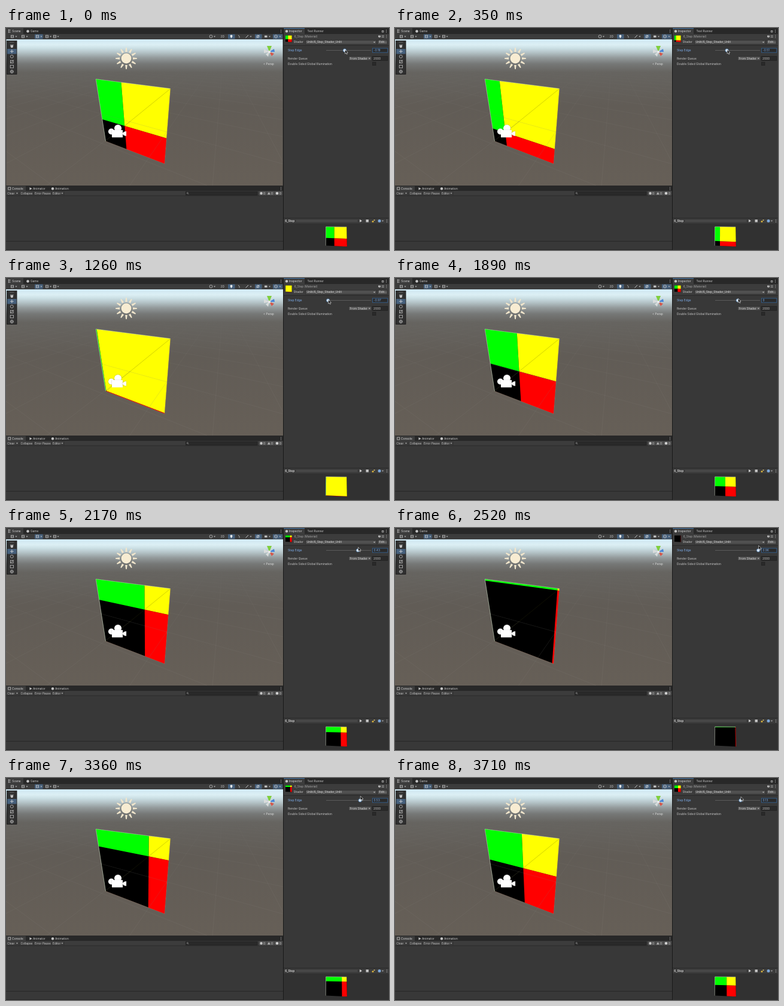
Write an HTML page with a canvas that moves like this. It is 640 by 372 pixels and loops after 3780 ms.

```html
<!DOCTYPE html>
<html lang="en">
<head>
<meta charset="utf-8">
<title>Step shader in the editor</title>
<style>
  html, body { margin: 0; width: 100%; height: 100%; overflow: hidden; background: #383838; }
  canvas { display: block; }
</style>
</head>
<body>
<canvas id="stage" width="640" height="372"></canvas>
<script>
const ctx = document.getElementById('stage').getContext('2d');
const LOOP = 3780, STEP = 70;

// [time, value] pairs, joined by straight lines
const EDGE = [[0, -.19], [700, -.83], [1050, -1], [1190, -1], [1260, -.97], [1890, 0],
  [2520, .96], [2660, 1], [2940, 1], [3080, .85], [3710, .13]];
const POINTER_Y = [[0, 36.5], [1260, 36.5], [1890, 34.5], [2520, 29.5], [3080, 29.5], [3710, 31.5]];

function sample(keys, t) {
  const i = keys.findIndex(k => k[0] >= t);
  if (i < 1) return keys[i < 0 ? keys.length - 1 : 0][1];
  const [t0, a] = keys[i - 1], [t1, b] = keys[i];
  return a + (b - a) * (t - t0) / (t1 - t0);
}

// ---- drawing helpers ----
function box(x, y, w, h, fill, border) {
  ctx.fillStyle = fill;
  ctx.fillRect(x, y, w, h);
  if (border) {
    ctx.strokeStyle = border;
    ctx.lineWidth = .8;
    ctx.strokeRect(x, y, w, h);
  }
}
function label(text, x, y, color = '#c8c8c8', weight = 400) {
  ctx.font = `${weight} 4.85px Inter, sans-serif`;
  ctx.textBaseline = 'middle';
  ctx.fillStyle = color;
  ctx.fillText(text, x, y);
}
function poly(points, fill) {
  ctx.beginPath();
  points.forEach(p => ctx.lineTo(...p));
  ctx.closePath();
  if (fill) { ctx.fillStyle = fill; ctx.fill(); }
}
function line(points, color, width = .8) {
  ctx.beginPath();
  points.forEach(p => ctx.lineTo(...p));
  ctx.strokeStyle = color;
  ctx.lineWidth = width;
  ctx.stroke();
}
function disc(x, y, r, fill) {
  ctx.beginPath();
  ctx.arc(x, y, r, 0, 7);
  ctx.fillStyle = fill;
  ctx.fill();
}
function ring(x, y, r, color = '#c4c4c4', width = .8) {
  ctx.beginPath();
  ctx.arc(x, y, r, 0, 7);
  ctx.strokeStyle = color;
  ctx.lineWidth = width;
  ctx.stroke();
}
const caret = (x, y) => poly([[x - 1.6, y - .8], [x + 1.6, y - .8], [x, y + 1.1]], '#b8b8b8');
const kebab = (x, y) => [-2, 0, 2].forEach(d => disc(x, y + d, .55, '#c4c4c4'));
const frame = (x, y, w, h) => { ctx.strokeStyle = '#c4c4c4'; ctx.lineWidth = .8; ctx.strokeRect(x, y, w, h); };

// ---- textured quad: corners are [x, y, weight] in order TL, TR, BL, BR ----
const SCENE_QUAD = [[150.2, 85.6, 1], [274.8, 101.6, .755], [166.6, 189.8, 1.243], [265, 227.6, .998]];
const PREVIEW_QUAD = [[534.6, 333, 1], [569.2, 333.4, 1], [534.3, 364.6, 1], [569.8, 366.3, 1]];
const ICON_QUAD = [[467, 12.4, 1], [477.6, 12.4, 1], [467, 23, 1], [477.6, 23.4, 1]];
const corners = quad => quad.map(([x, y]) => [x, y]);

function project(quad, u, v) {
  let x = 0, y = 0, sum = 0;
  quad.forEach(([px, py, weight], i) => {
    const w = weight * (i % 2 ? u : 1 - u) * (i > 1 ? v : 1 - v);
    x += px * w; y += py * w; sum += w;
  });
  return [x / sum, y / sum];
}
function patch(quad, u0, v0, u1, v1, fill) {
  poly([[u0, v0], [u1, v0], [u1, v1], [u0, v1]].map(([u, v]) => project(quad, u, v)), fill);
}
function stepQuad(quad, edge) {
  const u = (1 + edge) / 2, v = 1 - u;
  ctx.save();
  ctx.filter = 'blur(.45px)';
  patch(quad, 0, 0, 1, 1, '#000');
  patch(quad, 0, 0, u, v, '#0f0');
  patch(quad, u, v, 1, 1, '#f00');
  patch(quad, u, 0, 1, v, '#ff0');
  ctx.restore();
}

// ---- scene view ----
function grid(color, width) {
  const HORIZON = 36, BASE = 264;
  const fan = (vx, start, gap) => {
    for (let k = -10; k < 13; k++) line([[vx, HORIZON], [start + gap * k, BASE]], color, width);
  };
  fan(364, 68, 138.5);
  fan(-231, 594, 258);
}
function gradient(y0, y1, stops) {
  const g = ctx.createLinearGradient(0, y0, 0, y1);
  stops.forEach(([y, c]) => g.addColorStop((y - y0) / (y1 - y0), c));
  return g;
}
const SKY = gradient(19, 264, [[19, '#cfe8f3'], [28, '#dceff4'], [34, '#cbdfe4'], [41, '#b4c3c7'],
  [50, '#939a9b'], [60, '#767877'], [74, '#666460'], [130, '#615c56'], [264, '#665f57']]);
const GRID = gradient(60, 264, [[60, 'rgba(180,180,175,0)'], [130, 'rgba(180,180,175,.07)'], [264, 'rgba(180,180,175,.1)']]);

function sun(x, y) {
  ctx.save();
  ctx.translate(x, y);
  for (let i = 0; i < 12; i++) {
    poly([[-1.8, -11], [1.8, -11], [.8, -18], [-.8, -18]], '#f1e6cc');
    ctx.rotate(Math.PI / 6);
  }
  ctx.restore();
  ring(x, y, 9.2, 'rgba(110,105,95,.4)', 1.2);
  disc(x, y, 8.4, '#f7ecd2');
}
function cameraIcon() {
  ctx.save();
  ctx.shadowColor = 'rgba(90,90,90,.6)';
  ctx.shadowBlur = 1.5;
  disc(176, 173.5, 5, '#fff');
  disc(187, 168, 6, '#fff');
  box(177, 171, 18, 12.3, '#fff');
  poly([[194, 177], [197, 174], [201, 173], [201, 181], [197, 180]], '#fff');
  ctx.restore();
}
function axisGizmo(x, y) {
  poly([[x, y], [x - 9, y - 5], [x - 9, y + 2]], '#d8dcdc');
  poly([[x, y], [x - 6, y + 4], [x - 2, y + 8]], '#d8dcdc');
  poly([[x, y], [x + 8, y - 5], [x + 9, y]], '#4a86d8');
  poly([[x, y], [x + 8, y + 3], [x + 4, y + 7]], '#d5564a');
  poly([[x, y], [x - 4, y - 10], [x + 4, y - 10]], '#7fcf3d');
  box(x - 2, y - 2, 4, 4, '#e6e6e6');
}
function toolColumn() {
  box(1.5, 21.5, 16.5, 56, '#303030', '#171717');
  line([[6, 24], [13.5, 24]], '#777');
  box(2, 35, 15.5, 8.5, '#46607c');
  disc(9.8, 31, 2.2, '#c4c4c4');
  [-1.6, 0, 1.6].forEach(d => line([[9.8 + d, 31], [9.8 + d * 1.3, 27.6]], '#c4c4c4', 1));
  line([[6.8, 39.2], [12.8, 39.2]], '#e6e6e6');
  line([[9.8, 36.2], [9.8, 42.2]], '#e6e6e6');
  ring(9.8, 47.8, 2.5);
  frame(7.5, 54.2, 4.6, 4.6);
  line([[8, 58.3], [12.6, 53.7]], '#c4c4c4');
  frame(7.2, 62.3, 5.2, 4.6);
  ring(9.8, 73, 2.5);
  line([[6.8, 73], [12.8, 73]], '#c4c4c4', .6);
  line([[9.8, 70], [9.8, 76]], '#c4c4c4', .6);
}
function sceneView(edge) {
  ctx.save();
  ctx.beginPath();
  ctx.rect(0.5, 19, 462, 245);
  ctx.clip();
  box(0, 19, 463, 245, SKY);
  grid(GRID, .7);
  stepQuad(SCENE_QUAD, edge);

  ctx.save();
  patch(SCENE_QUAD, 0, .5, 1, 1);
  ctx.clip();
  grid('rgba(130,130,125,.3)', .6);
  ctx.restore();

  const [tl, tr, bl, br] = corners(SCENE_QUAD);
  line([tr, bl], 'rgba(70,70,20,.4)', .6);
  line([bl, tl, tr], 'rgba(205,220,195,.6)', 1);
  line([tr, br, bl], 'rgba(175,140,120,.5)', .8);

  sun(201, 51);
  cameraIcon();
  axisGizmo(440, 40);
  label('< Persp', 430, 60.3, '#e0e0e0');
  toolColumn();
  ctx.restore();
}

function sceneBars() {
  box(0, 0, 463, 10, '#282828');
  box(0, 0, 29, 10, '#3c3c3c');
  line([[3.5, 3.5], [8, 3.5]], '#c4c4c4');
  line([[3.5, 6.8], [8, 6.8]], '#c4c4c4');
  line([[4.8, 2], [4.8, 8.3]], '#c4c4c4');
  label('Scene', 10.3, 5.5, '#dedede');
  disc(36.5, 5.5, 2.3, '#c4c4c4');
  label('Game', 41, 5.5);
  kebab(459.5, 5.2);
  box(0, 10, 463, 9, '#3c3c3c');
  box(48, 10.5, 13.5, 7.8, '#46607c');
  [[10, 17], [28, 35], [52, 59], [68, 74.5], [81, 87]].forEach(([x, c]) => {
    frame(x - 1.5, 12.2, 4, 4);
    line([[x - 1.5, 14.2], [x + 2.5, 14.2]], '#c4c4c4', .5);
    caret(c, 14.3);
  });
  [[371, 11.5], [416, 11.5], [446, 16]].forEach(([x, w]) => box(x, 10.5, w, 7.8, '#46607c'));
  ring(342.5, 14.2, 2.4);
  caret(348.5, 14.3);
  label('2D', 358.5, 14.5);
  disc(376.5, 13.5, 1.9, '#e8e8e8');
  box(375.7, 15, 1.6, 1.8, '#e8e8e8');
  line([[388, 12], [390, 14], [390, 16.5]], '#c4c4c4');
  line([[400.5, 16.5], [405, 12]], '#c4c4c4', 1);
  caret(409, 14.3);
  ring(421, 14.2, 2, '#e8e8e8');
  line([[418.5, 16.5], [423.5, 12]], '#e8e8e8');
  box(432, 12.6, 4.5, 3.2, '#c4c4c4');
  caret(440.5, 14.3);
  ring(451, 14.2, 2.5);
  line([[448.5, 14.2], [453.5, 14.2]], '#c4c4c4', .5);
  caret(458, 14.3);
}

// ---- console ----
function consolePanel() {
  box(0, 264, 463, 108, '#383838');
  box(0, 264, 463, 9, '#282828');
  box(0, 264.8, 33, 8.2, '#3c3c3c');
  frame(3.7, 267, 4, 4);
  label('Console', 10, 269.3, '#dedede');
  poly([[39.5, 267], [43.5, 269.2], [39.5, 271.4]], '#c4c4c4');
  label('Animator', 45, 269.3);
  disc(78, 269.2, 2.2, '#c4c4c4');
  label('Animation', 82, 269.3);
  kebab(459.5, 269);
  box(0, 273, 463, 8, '#3c3c3c');
  line([[0, 281], [463, 281]], '#252525', .7);
  label('Clear', 2.2, 277.3);
  caret(18.5, 277);
  label('Collapse', 24.5, 277.3);
  label('Error Pause', 48, 277.3);
  label('Editor', 78, 277.3);
  caret(94, 277);
  [22, 46, 76, 97].forEach(x => line([[x, 273.5], [x, 280.5]], '#2b2b2b', .6));
  box(300.5, 274.2, 119.5, 5.8, '#292929', '#202020');
  ring(303.3, 276.6, 1.1, '#aaa', .6);
  line([[304, 277.5], [305.3, 278.8]], '#aaa', .6);
  [423, 436, 449].forEach(x => box(x, 273.5, 12.3, 7, '#505050'));
  disc(426.5, 277, 2.2, '#c4c4c4');
  label('0', 430, 277.3);
  poly([[437, 279], [441.6, 279], [439.3, 274.8]], '#b0b0b0');
  label('0', 443, 277.3);
  disc(453, 277, 2.3, '#d0d0d0');
  label('0', 457, 277.3);
  line([[0, 357.3], [463, 357.3]], '#232323');
  line([[0, 371.5], [463, 371.5]], '#232323');
}

// ---- inspector ----
function inspector(edge) {
  const x = 572.7 + 35.7 * edge;
  box(464, 0, 176, 372, '#383838');
  box(464, 0, 176, 10, '#282828');
  box(464, 0, 35, 10, '#3c3c3c');
  line([[464, .6], [499, .6]], '#3a79bb');
  disc(469, 5.4, 2.2, '#c4c4c4');
  label('Inspector', 473, 5.5, '#dedede');
  label('Test Runner', 503.5, 5.5);
  frame(628.3, 4.6, 2.6, 2.4);
  kebab(635.5, 5.2);

  box(464, 10, 176, 19, '#3c3c3c');
  line([[464, 29.2], [640, 29.2]], '#222', .7);
  stepQuad(ICON_QUAD, edge);
  label('6_Step (Material)', 481.8, 14.3, '#a8a8a8');
  disc(624, 14, 2.1, '#c4c4c4');
  label('?', 622.8, 14.3, '#3c3c3c');
  line([[627.5, 13], [632, 13]], '#c4c4c4');
  line([[627.5, 15.3], [632, 15.3]], '#c4c4c4');
  kebab(635.8, 14);
  label('Shader', 480.5, 23.7);
  box(500.5, 20.5, 118.5, 6.6, '#505050', '#303030');
  label('Unlit/6_Step_Shader_Unlit', 502.5, 23.7, '#dedede');
  caret(615.5, 23.8);
  box(621, 20.5, 16, 6.6, '#585858', '#303030');
  label('Edit...', 623.5, 23.7, '#dedede');

  label('Step Edge', 471, 37.6, '#7fb0f0');
  line([[535, 37.5], [610, 37.5]], '#656565');
  disc(x, 37.5, 3, 'rgba(83,139,196,.75)');
  disc(x, 37.5, 2.2, '#d8e6f4');
  box(612.5, 34, 25.3, 7, '#2a2a2a', '#34679d');
  label(String(+edge.toFixed(2) || 0), 614.5, 37.7, '#7fb0f0');

  label('Render Queue', 471, 51.4);
  box(572.5, 47.5, 38, 7, '#515151', '#303030');
  label('From Shader', 574.6, 51.3, '#dedede');
  caret(607.3, 51.1);
  box(612.5, 47.5, 25.3, 7, '#2a2a2a', '#212121');
  label('2000', 614, 51.4);
  label('Double Sided Global Illumination', 471, 60.2);
  box(612.5, 57.2, 5.4, 5.4, '#2a2a2a', '#212121');

  box(464, 319, 176, 8.5, '#3c3c3c');
  line([[464, 318.7], [640, 318.7]], '#222', .7);
  label('6_Step', 466.3, 323.4, '#dedede', 600);
  line([[485, 322.3], [587, 322.3]], '#606060', .6);
  line([[485, 324.2], [587, 324.2]], '#606060', .6);
  poly([[591, 320.8], [595, 323.2], [591, 325.6]], '#d0d0d0');
  box(601.5, 321, 4.4, 4.4, '#c4c4c4');
  disc(613, 324.3, 1.5, '#d8b23c');
  disc(615.5, 322, 1.1, '#d8c06a');
  disc(624, 323.2, 2.5, '#7da7d8');
  caret(629.5, 323.4);
  kebab(636.5, 323.2);
  box(464, 327.5, 176, 44.5, '#313131');
  stepQuad(PREVIEW_QUAD, edge);
  const [tl, tr, bl] = corners(PREVIEW_QUAD);
  line([bl, tl, tr], 'rgba(225,230,215,.55)', .9);
  line([[463.5, 0], [463.5, 372]], '#191919', 1);
  return x;
}

function pointer(x, y) {
  poly([[0, 0], [0, 6.6], [1.6, 5.2], [2.7, 7.6], [3.8, 7.1], [2.8, 4.8], [4.8, 4.7]]
    .map(([px, py]) => [x + px, y + py]), '#111');
  ctx.strokeStyle = '#f4f4f4';
  ctx.lineWidth = .6;
  ctx.stroke();
}

function draw(now) {
  const t = Math.floor(now % LOOP / STEP) * STEP;
  const edge = sample(EDGE, t);
  sceneBars();
  sceneView(edge);
  consolePanel();
  const knob = inspector(edge);
  pointer(knob + .6, sample(POINTER_Y, t));
  requestAnimationFrame(draw);
}
requestAnimationFrame(draw);
</script>
</body>
</html>
```
